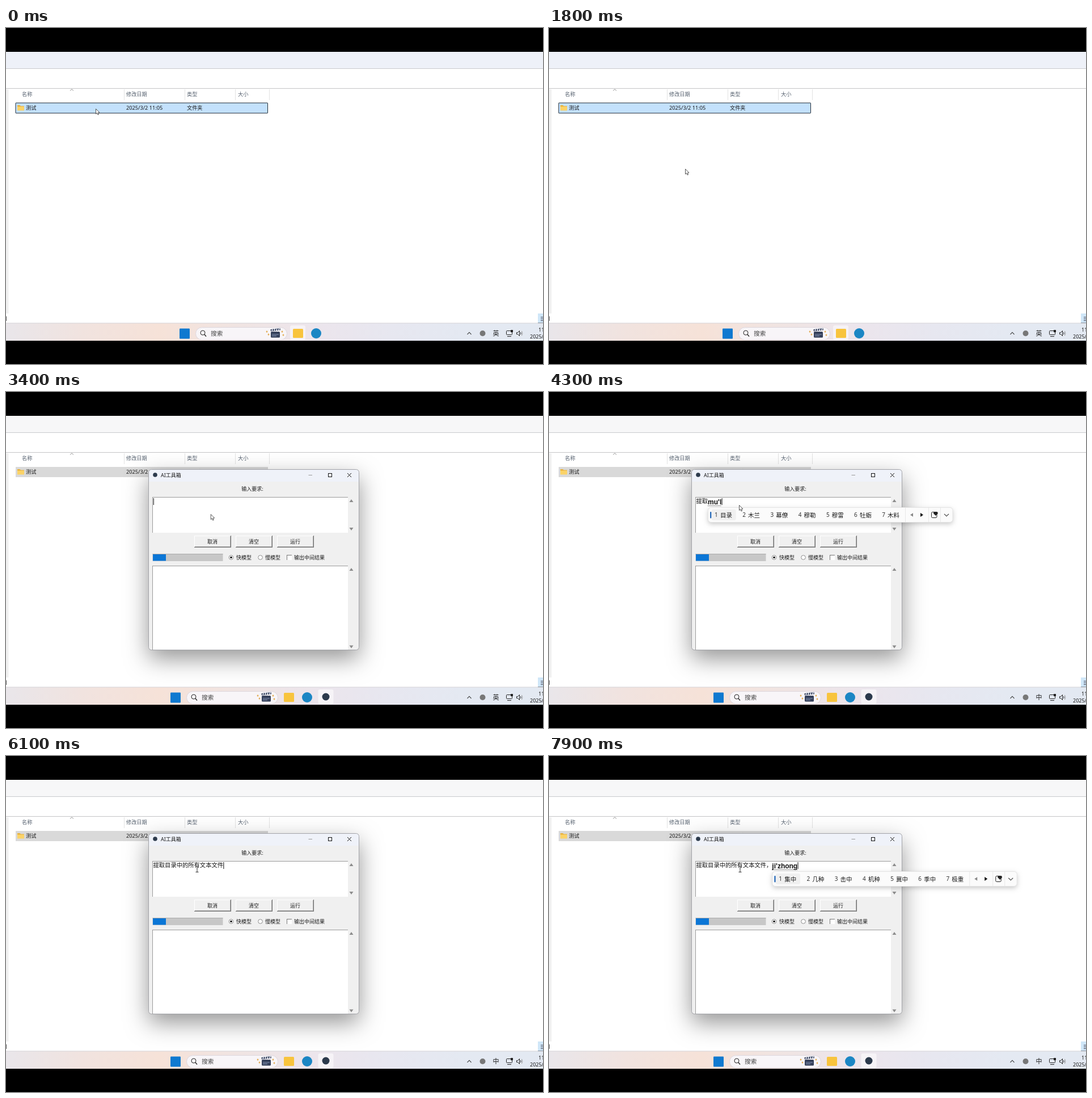
Recreate the animation shown at these times as an HTML page with a canvas. Size 947 by 592 pixels, loop 8 s.

```html
<!DOCTYPE html>
<html lang="zh-CN">
<head>
<meta charset="utf-8">
<style>
html, body { margin: 0; width: 100%; height: 100%; overflow: hidden; background: #000; }
canvas { display: block; }
</style>
</head>
<body>
<canvas id="stage" width="947" height="592"></canvas>
<script>
const ctx = document.getElementById('stage').getContext('2d');
const LOOP = 8000;
const UI = '"Noto Sans", "Noto Sans CJK SC", "Noto Sans CJK", sans-serif';
const EDIT = '"Liberation Sans", "Noto Sans CJK SC", "Noto Sans CJK", sans-serif';
const INK = '#1a1a1a';

const clamp = v => Math.max(0, Math.min(1, v));
const mix = (a, b, p) => a + (b - a) * p;
const smooth = p => p * p * (3 - 2 * p);
const easeOut = p => 1 - (1 - clamp(p)) ** 3;

function box(x, y, w, h, fill) {
  ctx.fillStyle = fill;
  ctx.fillRect(x, y, w, h);
}

function round(x, y, w, h, r, fill, stroke) {
  ctx.beginPath();
  ctx.roundRect(x, y, w, h, r);
  if (fill) { ctx.fillStyle = fill; ctx.fill(); }
  if (stroke) { ctx.strokeStyle = stroke; ctx.lineWidth = 1; ctx.stroke(); }
}

function shadowed(blur, dy, alpha, draw) {
  ctx.save();
  ctx.shadowColor = `rgba(0,0,0,${alpha})`;
  ctx.shadowBlur = blur;
  ctx.shadowOffsetY = dy;
  draw();
  ctx.restore();
}

function disc(x, y, r, fill, stroke) {
  ctx.beginPath();
  ctx.arc(x, y, r, 0, 7);
  if (fill) { ctx.fillStyle = fill; ctx.fill(); }
  if (stroke) { ctx.strokeStyle = stroke; ctx.lineWidth = 1; ctx.stroke(); }
}

function line(color, width, ...p) {
  ctx.beginPath();
  ctx.moveTo(p[0], p[1]);
  for (let i = 2; i < p.length; i += 2) ctx.lineTo(p[i], p[i + 1]);
  ctx.strokeStyle = color;
  ctx.lineWidth = width;
  ctx.stroke();
}

function poly(fill, ...p) {
  ctx.beginPath();
  for (let i = 0; i < p.length; i += 2) ctx.lineTo(p[i], p[i + 1]);
  ctx.closePath();
  ctx.fillStyle = fill;
  ctx.fill();
}

// y is the middle of the line
function text(s, x, y, size = 9, color = INK, align = 'left', face = UI, weight = 400) {
  ctx.font = `${weight} ${size}px ${face}`;
  ctx.textAlign = align;
  ctx.fillStyle = color;
  ctx.fillText(s, x, y + size * 0.37);
  return ctx.measureText(s).width;
}

/* ---------- mouse ---------- */
const PATH = [
  [0, 158, 142], [250, 158, 142], [450, 168, 147], [550, 168, 147], [1000, 253, 238],
  [1300, 240, 248], [1900, 240, 248], [2500, 373, 293], [2700, 373, 293],
  [3000, 436, 262], [3200, 436, 262], [3500, 335, 199], [LOOP, 335, 199]
];

function mouseAt(t) {
  const i = PATH.findIndex(k => k[0] > t);
  const [t0, x0, y0] = PATH[i - 1], [t1, x1, y1] = PATH[i];
  const p = smooth((t - t0) / (t1 - t0));
  return [mix(x0, x1, p), mix(y0, y1, p)];
}

function drawMouse(t) {
  const [x, y] = mouseAt(t);
  if (t >= 5700) {
    line('#333', 1, 334.5, 194.5, 339.5, 194.5);
    line('#333', 1, 337, 194, 337, 205);
    line('#333', 1, 334.5, 204.5, 339.5, 204.5);
    return;
  }
  ctx.save();
  ctx.translate(x, y);
  ctx.lineJoin = 'round';
  poly('#fff', 0.5, 0.5, 0.5, 9.5, 2.6, 7.7, 4, 11, 5.6, 10.3, 4.2, 7.2, 7, 7);
  ctx.strokeStyle = '#444';
  ctx.lineWidth = 0.9;
  ctx.stroke();
  ctx.restore();
}

/* ---------- file list ---------- */
function drawFiles(t) {
  const p = clamp((t - 2450) / 400);
  box(0, 42, 947, 509, '#fff');
  box(0, 42, 947, 29, `rgb(${mix(238, 247, p)},${mix(241, 247, p)},${mix(248, 248, p)})`);
  box(0, 71, 947, 1, '#c9cacd');
  box(0, 106, 947, 1, '#c4c4c6');
  box(0, 108, 4, 395, '#f1f1f1');
  box(4, 108, 1, 395, '#f8f8f8');
  for (const x of [208, 315, 404, 464]) box(x, 108, 1, 19, '#e2e2e2');
  line('#888', 0.9, 113, 110.5, 116, 107.8, 119, 110.5);
  const heads = [['名称', 28], ['修改日期', 212], ['类型', 319], ['大小', 409]];
  for (const [s, x] of heads) text(s, x, 117, 9.2, '#56616f');

  if (t < 1950) round(17, 132, 444.5, 18, 0.5, '#c3e1fc', '#1f2a36');
  else box(17, 132, 445, 18, '#d9d9d9');
  poly('#e8b23c', 20, 136, 24.5, 136, 26, 137.5, 32, 137.5, 32, 140, 20, 140);
  box(20, 138.5, 12, 7, '#fbd368');
  text('测试', 35, 141, 9.2);
  text('2025/3/2 11:05', 212, 141, 9.2);
  text('文件夹', 319, 141, 9.2);

  box(0, 508, 1, 8, '#555');
  box(938, 503, 9, 17, '#cfe6f8');
  box(938, 519, 9, 1, '#4d5b68');
  for (const y of [509, 512, 515]) box(943, y, 4, 1, '#445');
}

/* ---------- taskbar ---------- */
const SHIFT = [[315, 299, 4], [334, 318, 63], [515, 499, 83], [547, 531, 92]];
const TINTS = ['#e9e6ea', '#f1e3df', '#f6e2d8', '#f0e4e2', '#ece5ec', '#e7e7f0', '#e4e9f2', '#e3e9f2'];

function drawTaskbar(t) {
  const g = ctx.createLinearGradient(0, 0, 947, 0);
  TINTS.forEach((c, i) => g.addColorStop(i / (TINTS.length - 1), c));
  box(0, 520, 947, 31, g);
  box(0, 519.5, 947, 1, '#d5d3d8');
  const [start, find, folder, globe] =
    SHIFT.map(([a, b, d]) => mix(a, b, easeOut((t - 2500 - d) / 400)));

  round(start - 9, 529.5, 18, 18, 1, '#0f79d0');

  round(find + 0.5, 527.5, 161, 22, 11, '#f8f5f8', '#ddd6dc');
  disc(find + 13, 537, 4, null, '#222');
  line('#222', 1.3, find + 16, 540, find + 19, 543.5);
  text('搜索', find + 27, 538, 10.7, '#444');
  drawClapper(find + 141);

  if (t < 2450) round(folder - 14, 524, 27, 25.5, 3, 'rgba(255,255,255,.5)');
  round(folder - 9, 530, 18, 16, 1.5, '#f8c43d');
  disc(globe, 538, 9, '#1b86c4');

  const seen = clamp((t - 2700) / 200);
  if (seen) {
    ctx.globalAlpha = seen;
    round(550.5, 524, 27, 25.5, 3, 'rgba(255,255,255,.55)');
    disc(564, 537, 6.5, '#2c3a4c');
    ctx.globalAlpha = 1;
  }

  line('#333', 1.1, 813.5, 539.8, 817, 536.2, 820.5, 539.8);
  disc(840.5, 538, 5, '#777');
  text(t < 3500 ? '英' : '中', 864, 538, 11, INK, 'center');
  round(882.5, 533.5, 10, 7, 1, null, '#222');
  line('#222', 1, 884, 543.5, 891, 543.5);
  box(890, 532, 4, 4, '#222');
  line('#222', 1, 900.5, 536.5, 902.5, 536.5, 905.5, 533.5, 905.5, 542.5, 902.5, 539.5, 900.5, 539.5, 900.5, 536.5);
  line('#222', 1, 907.5, 536, 908.3, 538, 907.5, 540);
  line('#999', 1, 909.5, 534, 910.8, 538, 909.5, 542);
  text('11:05', 939, 532, 9);
  text('2025/3/2', 924, 544, 9);
}

function drawClapper(x) {
  round(x - 8, 535, 16, 10.5, 1.5, '#35405a');
  box(x - 6, 539.5, 12, 1, '#8796b8');
  box(x - 6, 542, 8, 1, '#8796b8');
  ctx.save();
  ctx.translate(x - 8, 534.5);
  ctx.rotate(-0.14);
  box(0, -3.5, 17, 3.6, '#2c3650');
  for (let i = 0; i < 4; i++) poly('#dfe5f2', 1 + i * 4, 0, 3 + i * 4, 0, 4.5 + i * 4, -3.4, 2.5 + i * 4, -3.4);
  ctx.restore();
  for (const [dx, y] of [[-15, 535], [-12, 540], [12, 535], [14, 541]]) {
    poly('#e3ad55', x + dx, y - 2, x + dx + 1.6, y, x + dx, y + 2, x + dx - 1.6, y);
  }
}

/* ---------- context menu ---------- */
const MENU = [
  [119, '打开(O)'], [135.3, '在新进程中打开(P)'], [152, '在新标签页中打开(B)'], [168.5, '在新窗口中打开(E)'],
  [185, '固定到快速访问(Q)'], [201.7, '在终端中打开(T)'], [218, 'Open Lum GUI here'],
  [234.7, 'Open Lum Dusk here'], [251.3, 'AI工具箱'], [268, '在此处打开 Quillhusk 窗口(S)'],
  [284.5, '使用 Larkenvale Warden扫描...'], [306.3, '授予访问权限(G)', 1], [322.7, '还原以前的版本(V)'],
  [339.2, '包含到库中(I)', 1], [356, '固定到"开始"(P)'], [372.5, '复制文件地址(A)'], [394, '发送到(N)', 1],
  [415.7, '剪切(T)'], [432.5, '复制(C)'], [454, '创建快捷方式(S)'], [470.5, '删除(D)'],
  [487.3, '重命名(M)'], [509, '属性(R)']
];

function drawMenu(t) {
  if (t < 500 || t >= 1500) return;
  const [mx, my] = mouseAt(t);
  shadowed(6, 1, 0.16, () => round(168.5, 108.5, 209, 411, 3, '#f9f9f9'));
  round(168.5, 108.5, 209, 411, 3, null, '#dcdcdc');
  for (const y of [295, 383, 498]) box(170, y, 207, 1, '#e4e4e4');
  MENU.forEach(([y, label, more], i) => {
    if (mx > 171 && Math.abs(my - y) < 8.3) round(171, y - 8.3, 205, 16.6, 2, '#eeeeee');
    text(label, 194.5, y, 9, INK, 'left', UI, i ? 400 : 700);
    if (more) line('#333', 1, 365, y - 3, 368, y, 365, y + 3);
  });
  round(175.5, 197, 11, 9.5, 1, '#2b2b2b');
  line('#fff', 1, 177.5, 199.5, 179.5, 201.5, 177.5, 203.5);
  line('#fff', 1, 181, 204, 184.5, 204);
  for (const y of [218, 234.7]) box(177, y - 4, 8, 8, '#e9a27c');
  ctx.beginPath();
  ctx.ellipse(181, 251.3, 5.3, 4, 0, 0, 7);
  ctx.strokeStyle = '#222';
  ctx.lineWidth = 1.2;
  ctx.stroke();
  disc(181, 251.3, 1.7, '#222');
  disc(181, 284.5, 5, '#1676cf');
}

/* ---------- typed text: time, settled text, composition, candidates ---------- */
const WORDS = {
  ti: '提取 体曲 题曲 梯区 提去 体区 替取',
  mu: '目录 木兰 幕僚 穆勒 穆雷 牡蛎 木料',
  zhong: '中 种 重 终 众 钟 忠',
  de: '的 得 地 德 嘚 底 锝',
  suo: '所有 索要 锁有 所由 所幼 所诱 缩又',
  ben: '文本 稳本 问本 文奔 闻本 纹本 吻本',
  jian: '文件 稳健 问件 文检 闻见 文简 吻见',
  ji: '集中 几种 击中 机种 冀中 季中 极重'
};
const BASE = '提取目录中的所有文本文件';
const KEYS = [
  [2500, '解压这个文件并提取里面的jpg文件到一个目录'], [3150, ''],
  [3600, '', 't', 'ti'], [3700, '', 'ti', 'ti'], [3850, '', "ti'q", 'ti'], [3950, '', "ti'qu", 'ti'], [4050, 2],
  [4150, 2, 'm', 'mu'], [4200, 2, 'mu', 'mu'], [4300, 2, "mu'l", 'mu'], [4400, 2, "mu'lu", 'mu'], [4500, 4],
  [4570, 4, 'zh', 'zhong'], [4670, 4, 'zhong', 'zhong'], [4750, 5], [4800, 5, 'de', 'de'], [4870, 6],
  [4930, 6, 'suo', 'suo'], [5020, 6, "suo'y", 'suo'], [5100, 6, "suo'you", 'suo'], [5180, 8],
  [5380, 8, 'wen', 'ben'], [5480, 8, "wen'ben", 'ben'], [5580, 10],
  [5680, 10, 'wen', 'jian'], [5780, 10, "wen'j", 'jian'], [5880, 10, "wen'jian", 'jian'], [6000, 12],
  [6450, BASE + '，'], [6800, BASE + '，', 'j', 'ji'], [6950, BASE + '，', 'ji', 'ji'],
  [7200, BASE + '，', "ji'z", 'ji'], [7350, BASE + '，', "ji'zh", 'ji'], [7500, BASE + '，', "ji'zhong", 'ji']
];

function drawTyped(t) {
  const [at, done, comp, list] = KEYS.filter(k => k[0] <= t).pop();
  const s = typeof done === 'number' ? BASE.slice(0, done) : done;
  let x = 259.5 + text(s, 259.5, 192.5, 10.3, '#111', 'left', EDIT);
  const from = x;
  if (comp) {
    x += text(comp, x, 193.5, 12, '#111', 'left', EDIT, 700);
    ctx.setLineDash([1, 1]);
    line('#333', 1, from, 200.5, x, 200.5);
    ctx.setLineDash([]);
  }
  if (at >= 3150 && (t - at) % 1060 < 530) box(x + 0.3, 187, 1, 12, '#111');
  return comp && [from + 0.5, WORDS[list].split(' ')];
}

function drawCandidates(x, words) {
  const step = w => 28.4 + 10.4 * w.length;
  const tail = x + 3 + words.reduce((sum, w) => sum + step(w), 0);
  shadowed(9, 3, 0.22, () => round(x, 203.5, tail + 84 - x, 26, 5, '#fbfbfb'));
  round(x, 203.5, tail + 84 - x, 26, 5, null, '#e3e3e3');
  round(x + 6, 207, step(words[0]) - 6, 19, 3, '#f0f0f0');
  round(x + 3.5, 211, 2.2, 11.5, 1, '#1c62b4');
  let cx = x + 11.5;
  words.forEach((w, i) => {
    text(i + 1, cx, 216.7, 10, '#333');
    text(w, cx + 9.8, 216.7, 10.5);
    cx += step(w);
  });
  for (const dx of [0, 41, 62]) box(tail + dx, 204, 1, 25, '#e8e8e8');
  poly('#888', tail + 9, 216.5, tail + 14, 213.2, tail + 14, 219.8);
  poly('#111', tail + 32, 216.5, tail + 27, 213, tail + 27, 220);
  round(tail + 46.5, 211.5, 9.5, 10, 2, null, '#222');
  disc(tail + 52.3, 213.2, 2.2, '#222');
  disc(tail + 55.5, 213.2, 2.2, '#222');
  poly('#222', tail + 50.4, 214.2, tail + 57.4, 214.2, tail + 53.9, 218);
  line('#333', 1.1, tail + 69, 214.8, tail + 73, 218.8, tail + 77, 214.8);
}

/* ---------- tool window ---------- */
function arrows(top, bottom) {
  poly('#8c8c8c', 605.5, top + 2.5, 612.5, top + 2.5, 609, top - 2.5);
  poly('#8c8c8c', 605.5, bottom - 2.5, 612.5, bottom - 2.5, 609, bottom + 2.5);
}

function field(y, h) {
  box(258, y, 345, h, '#fff');
  box(258, y, 345, 1, '#9b9b9b');
  box(258, y, 1, h, '#9b9b9b');
}

function button(x, label) {
  box(x, 253, 65, 21, '#6f6f6f');
  box(x, 253, 64, 20, '#fff');
  box(x + 1, 254, 63, 19, '#a8a8a8');
  box(x + 1, 254, 62, 18, '#f0f0f0');
  text(label, x + 32, 263.5, 9, INK, 'center');
}

function drawWindow(t) {
  if (t < 2520) return;
  const p = easeOut((t - 2600) / 150);
  const k = mix(0.963, 1, p);
  const fresh = t < 2700;
  ctx.save();
  ctx.globalAlpha = clamp((t - 2500) / 90);
  ctx.translate(mix(253, 251, p), mix(138, 136, p));
  ctx.scale(k, k);
  ctx.translate(-251, -136);
  shadowed(40, 15, 0.42, () => round(251.5, 136.5, 371, 318, 5, '#f0f0f0'));
  ctx.save();
  ctx.beginPath();
  ctx.roundRect(251.5, 136.5, 371, 318, 5);
  ctx.clip();
  box(251, 136, 373, 22, '#eff2f9');
  disc(263, 146, 3.8, '#2c3a4c');
  text('AI工具箱', 273, 147, 9);
  line('#999', 1, 533.5, 146.5, 540, 146.5);
  ctx.strokeStyle = '#111';
  ctx.strokeRect(568.5, 143.5, 6, 6);
  line('#111', 1, 602, 143, 609, 150);
  line('#111', 1, 609, 143, 602, 150);
  text('输入要求:', 434.5, 170.5, 9, INK, 'center');

  field(185, 63);
  if (fresh) {
    box(609, 198, 1.4, 13, '#777');
    box(609, 319, 1.4, 13, '#777');
    box(602, 317, 1, 125, '#fff');
  } else {
    field(306, 150);
    arrows(191.5, 241.5);
    arrows(312.5, 449);
  }
  button(332, '取消');
  button(405, '清空');
  button(478, '运行');

  box(258.5, 285, 124, 13, '#c7c7c7');
  box(258.5, 285, 124, 1, '#aaa');
  box(259, 286, 23, 11.5, '#0b76d6');
  for (const x of [397, 448.5]) disc(x, 291.5, 3.8, '#fff', '#8b8b8b');
  disc(397, 291.5, 1.8, '#111');
  text('快模型', 406, 291.7, 9);
  text('慢模型', 457, 291.7, 9);
  box(495, 287, 9, 9, '#777');
  box(496, 288, 8, 8, '#fff');
  text('输出中间结果', 508, 291.7, 9);
  const ime = drawTyped(t);
  ctx.restore();
  round(251.5, 136.5, 371, 318, 5, null, '#a2a3a8');
  if (ime) drawCandidates(...ime);
  ctx.restore();
}

function draw(t) {
  box(0, 0, 947, 592, '#000');
  drawFiles(t);
  drawTaskbar(t);
  drawMenu(t);
  drawWindow(t);
  drawMouse(t);
}

const begun = performance.now();
function tick() {
  draw((performance.now() - begun) % LOOP);
  requestAnimationFrame(tick);
}
tick();
</script>
</body>
</html>
```
